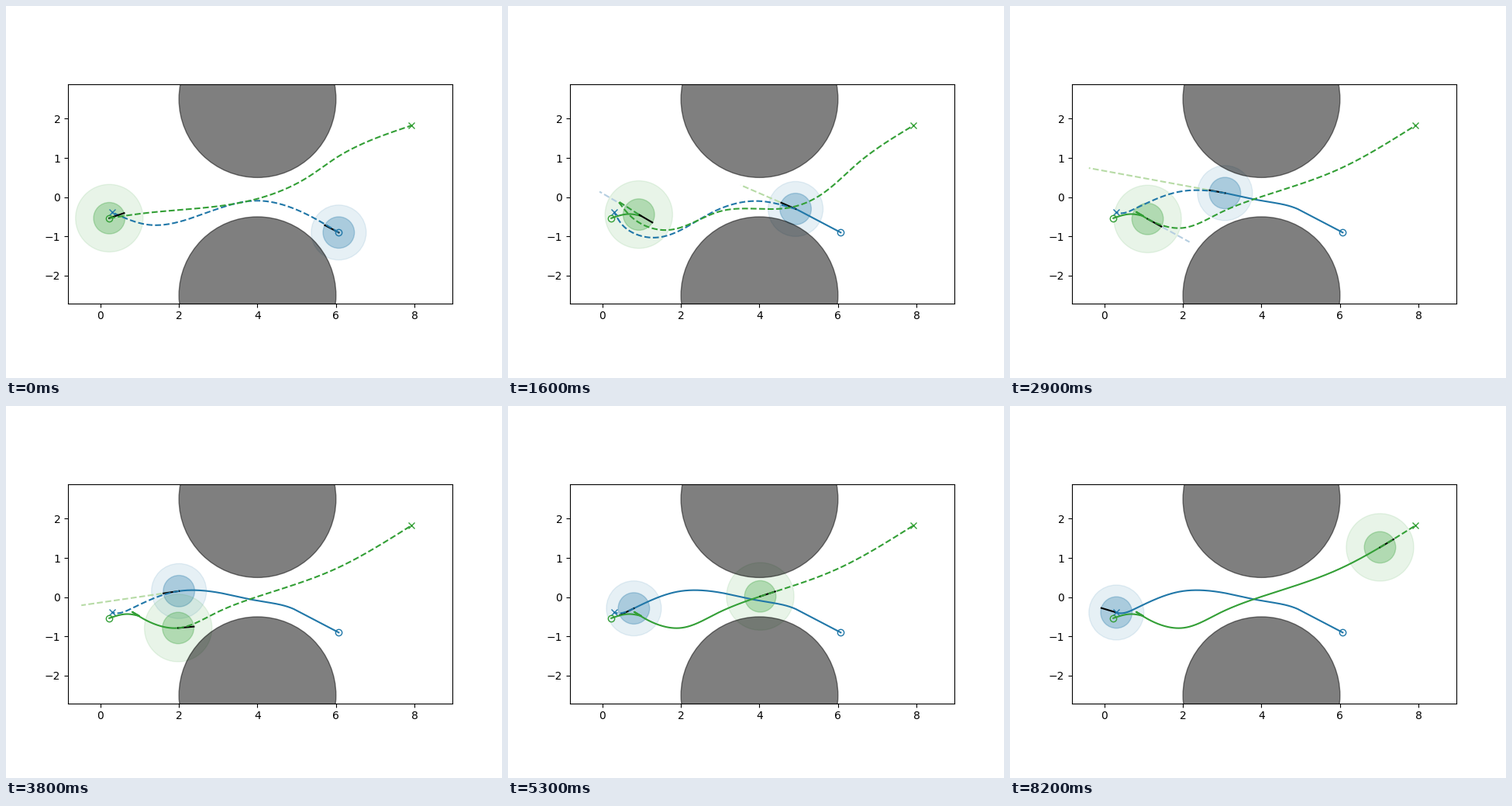
Animation, 640 px wide and 480 px high, one loop 8300 ms. Source, as a matplotlib script:

```python
import numpy as np
import matplotlib.pyplot as plt
from matplotlib.animation import FuncAnimation
from matplotlib.patches import Circle

FRAMES, INTERVAL = 83, 100
SAMPLES = 40      # samples per curve segment
HORIZON = 2.9     # seconds of straight-line prediction
REPLAN = 1.6      # moment of the second plan
SETTLED = 2.7     # from here the plan is the way really taken

BLUE, LIGHT_BLUE = "#2077a8", "#b5cee0"
GREEN, LIGHT_GREEN = "#339f36", "#b7dba6"


def spline(p):
    """Natural cubic spline by chord length."""
    h = np.hypot(*np.diff(p, axis=0).T)
    slope = np.diff(p, axis=0) / h[:, None]
    system, bend = np.eye(len(p)), np.zeros_like(p)
    for i in range(1, len(p) - 1):
        system[i, i - 1:i + 2] = h[i - 1], 2 * (h[i - 1] + h[i]), h[i]
        bend[i] = 6 * (slope[i] - slope[i - 1])
    bend = np.linalg.solve(system, bend)
    f = (np.arange(SAMPLES) / SAMPLES)[:, None]
    g = 1 - f
    parts = [g * p[i] + f * p[i + 1]
             + h[i]**2 / 6 * ((g**3 - g) * bend[i] + (f**3 - f) * bend[i + 1])
             for i in range(len(h))]
    return np.vstack(parts + [p[-1:]])


def drive(points, cusps=()):
    """Path and headings; the gear reverses at each cusp."""
    p = np.array(points, float)
    ends = [0, *cusps, len(p) - 1]
    paths, heads = [], []
    for k, (a, b) in enumerate(zip(ends, ends[1:])):
        curve = spline(p[a:b + 1])
        head = np.gradient(curve, axis=0) * (-1)**k
        first = 1 if k else 0
        paths.append(curve[first:])
        heads.append((head / np.hypot(*head.T)[:, None])[first:])
    return np.vstack(paths), np.vstack(heads)


def arc(curve):
    return np.concatenate([[0], np.cumsum(np.hypot(*np.diff(curve, axis=0).T))])


def along(curve, lengths, d):
    return np.column_stack([np.interp(d, lengths, col) for col in curve.T])


def rest_of(curve, start, n=400):
    lengths = arc(curve)
    return along(curve, lengths, np.linspace(start, lengths[-1], n))


def smooth(t, a, b):
    u = np.clip((t - a) / (b - a), 0, 1)
    return u * u * (3 - 2 * u)


def monotone(times, values, stops):
    """Cubic easing through the keys, at rest at the start and at stops."""
    slope = np.diff(values) / np.diff(times)
    m = np.concatenate([[0], np.minimum(slope[:-1], slope[1:]), slope[-1:]])
    m[list(stops)] = 0

    def f(t):
        t = np.clip(t, times[0], times[-1])
        i = min(np.searchsorted(times, t, side="right") - 1, len(slope) - 1)
        h = times[i + 1] - times[i]
        u = (t - times[i]) / h
        return (values[i] + (values[i + 1] - values[i]) * u * u * (3 - 2 * u)
                + h * u * (1 - u) * (m[i] * (1 - u) - m[i + 1] * u))
    return f


class Robot:
    def __init__(self, ax, stops, plans, color, light, reach, seen_until, cusps=()):
        """stops: rows of (seconds, x, y)."""
        stops = np.array(stops, float)
        self.path, self.head = drive(stops[:, 1:], cusps)
        self.lengths = arc(self.path)
        self.travel = monotone(stops[:, 0], self.lengths[::SAMPLES], cusps)
        self.first, self.second = plans
        self.seen_until = seen_until

        self.discs = [ax.add_patch(Circle((0, 0), r, color=color, alpha=alpha))
                      for r, alpha in ((reach, 0.11), (0.4, 0.3))]
        self.trail, = ax.plot([], [], color=color)
        self.guess, = ax.plot([], [], "--", color=light)
        self.nose, = ax.plot([], [], color="black")
        self.plan, = ax.plot([], [], "--", color=color)
        for point, mark in ((self.path[0], "o"), (self.first[-1], "x")):
            ax.plot(*point, mark, color=color, fillstyle="none")

    def planned(self, t, s, pos):
        final = rest_of(self.path, s)
        if t >= SETTLED:
            return final
        early = rest_of(self.first, s)
        late = rest_of(self.second, max(0, s - self.travel(REPLAN)))
        line = early + (late - early) * smooth(t, 0.6, 1.4)
        line = line + (final - line) * smooth(t, 1.7, SETTLED)
        fade = np.linspace(1, 0, len(line))[:, None] ** 8
        return line + (pos - line[0]) * fade

    def update(self, t):
        s = self.travel(t)
        pos = along(self.path, self.lengths, [s])[0]
        head = along(self.head, self.lengths, [s])[0]
        head /= np.hypot(*head)
        for disc in self.discs:
            disc.center = pos
        self.trail.set_data(*np.vstack([self.path[self.lengths < s], pos]).T)
        self.nose.set_data(*np.array([pos, pos + 0.4 * head]).T)
        self.plan.set_data(*self.planned(t, s, pos).T)

        ahead, behind = (along(self.path, self.lengths, [self.travel(t + dt)])[0]
                         for dt in (0.02, -0.02))
        speed = (ahead - behind) @ head / 0.04
        self.guess.set_data(*np.array([pos, pos + HORIZON * speed * head]).T)
        self.guess.set_visible(0 < t < self.seen_until)


fig, ax = plt.subplots(figsize=(6.4, 4.8), dpi=100)
blue_goal, green_goal = (0.304, -0.39), (7.92, 1.825)

blue = Robot(
    ax,
    stops=[(0, 6.07, -0.9), (1.2, 5.1, -0.39), (1.6, 4.92, -0.3),
           (2.3, 4, -0.09), (2.9, 3.07, 0.105), (3.8, 2, 0.155),
           (5.3, 0.8, -0.285), (6.8, 0.34, -0.4), (8.2, *blue_goal)],
    plans=[drive([(6.07, -0.9), (4.9, -0.28), (4, -0.09), (1.2, -0.7), blue_goal])[0],
           drive([(4.92, -0.3), (4, -0.1), (2.83, -0.37), (1.25, -1.03),
                  (0.5, -0.7), blue_goal])[0]],
    color=BLUE, light=LIGHT_GREEN, reach=0.7, seen_until=4.25)

green = Robot(
    ax,
    stops=[(0, 0.225, -0.535), (0.8, 0.7, -0.43), (1.3, 0.99, -0.48),
           (2.05, 0.81, -0.375), (2.9, 1.1, -0.555), (3.8, 1.98, -0.785),
           (4.5, 2.9, -0.42), (5.3, 4.02, 0.02), (6.8, 5.92, 0.69),
           (8.2, 7.02, 1.27), (9.8, *green_goal)],
    cusps=(2, 3),
    plans=[drive([(0.225, -0.535), (1.1, -0.41), (4, -0.04), (5.3, 0.52),
                  (6, 1), green_goal])[0],
           drive([(0.97, -0.46), (0.42, -0.11), (0.8, -0.55), (1.65, -0.84),
                  (3, -0.36), (4.8, -0.26), (5.5, 0.02), (6.5, 0.86),
                  green_goal], cusps=(1,))[0]],
    color=GREEN, light=LIGHT_BLUE, reach=0.86, seen_until=3.35)

for y in (2.5, -2.5):
    ax.add_patch(Circle((4, y), 2, color="black", alpha=0.5))

ax.set_aspect("equal")
ax.set_xlim(-0.827, 8.966)
ax.set_ylim(-2.706, 2.875)


def draw(i):
    for robot in (blue, green):
        robot.update(i * INTERVAL / 1000)
    return []


anim = FuncAnimation(fig, draw, frames=FRAMES, interval=INTERVAL,
                     repeat=True, repeat_delay=0)
plt.show()
```
